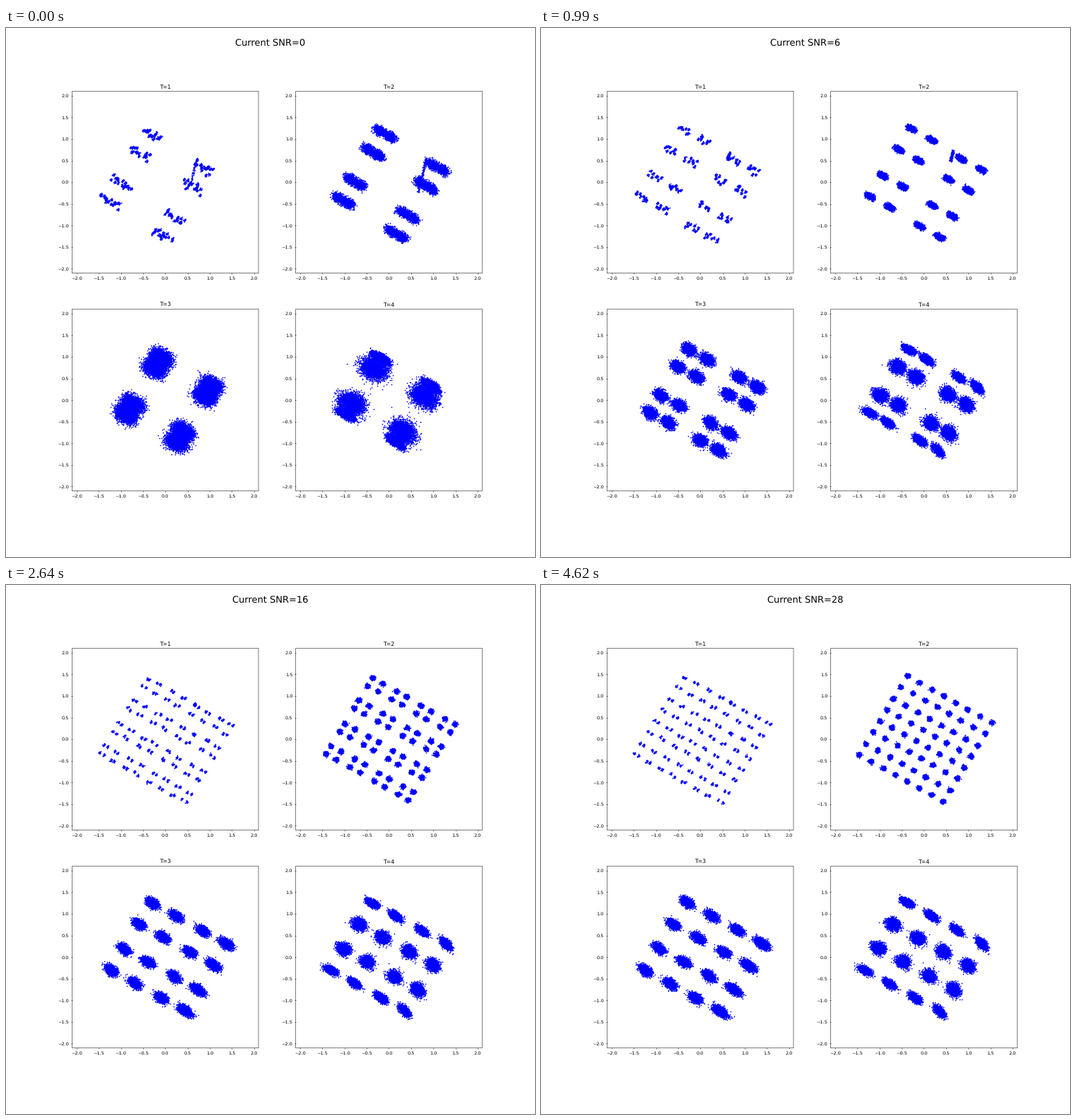
Write a matplotlib script that moves like this. It is 748x748 px and loops after 4950 ms.

```python
import numpy as np
import matplotlib.pyplot as plt
from matplotlib.animation import FuncAnimation

STAGE, DPI = 748, 46.75
STEP_MS, STEPS = 330, 15
U = np.array([.54, -.305])  # direction along a row of the constellation
V = np.array([-.31, -.515])  # direction from row to row
rng = np.random.default_rng(7)


def decay(snr, tau):
    return np.exp(-snr / tau)


def ramp(snr, knee, power):
    """Rise from 0 to 1 around the knee: a finer bit becomes usable."""
    return 1 - np.exp(-(snr / knee) ** power)


def levels(*amps):
    """All sums of +-amplitude, coarsest bit first."""
    out = np.zeros(1)
    for amp in amps:
        out = np.add.outer(out, [-amp, amp]).ravel()
    return out


def lattice(cols, rows, centre):
    """Cluster centres, row by row."""
    grid = cols[None, :, None] * U + rows[:, None, None] * V
    return grid.reshape(-1, 2) + centre


def normal(k, n, limit):
    return np.clip(rng.standard_normal((k, n, 2)), -limit, limit)


def spread(noise, major, minor, angle):
    """Turn unit noise (k, n, 2) into tilted ellipses."""
    major, minor, angle = (np.reshape(v, (-1, 1)) for v in (major, minor, angle))
    c, s = np.cos(np.radians(angle)), np.sin(np.radians(angle))
    a, b = noise[..., 0] * major, noise[..., 1] * minor
    return np.stack([a * c - b * s, a * s + b * c], axis=-1)


def scatter(centres, offsets):
    return (centres[:, None] + offsets).reshape(-1, 2)


def fine_lattice(snr, cols, rows, centre):
    """Lattice of T=1 and T=2; its right half sags while the SNR is low."""
    centres = lattice(cols, rows, centre)
    right = np.tile(cols > 0, len(rows))
    centres[:, 1] -= .1 * decay(snr, 10) * right
    return centres


def coarse_bits(snr):
    cols = 1 + .1 * decay(snr, 6), .51 - .31 * decay(snr, 5)
    rows = 1 + .08 * decay(snr, 12), .52 - .1 * decay(snr, 10)
    return cols, rows


def tail(snr, start, shift, scale, noise):
    """Thin streak hanging from one cluster, shrinking with the SNR."""
    length = .8 * decay(snr, 5)
    t = np.linspace(0, length * scale, len(noise))[:, None]
    start = start + np.array(shift) * min(1, length / .15)
    return start + t * (-.24, -1) + .014 * noise


dots, dot_shift = normal(128, 16, 1.6), normal(128, 1, 2)
patches = normal(64, 170, 2.6)
clouds_3, clouds_4 = normal(16, 1400, 4), normal(16, 1400, 4)
tail_1, tail_2 = normal(1, 70, 1.5)[0], normal(1, 150, 2)[0]


def panel_1(snr):
    cols, rows = coarse_bits(snr)
    cols = levels(*cols, .09 + .165 * ramp(snr, 11, 1.6), .045 + .025 * ramp(snr, 11, 1.6))
    rows = levels(*rows, .055 + .18 * ramp(snr, 15, 4))
    grid = fine_lattice(snr, cols, rows, (.05 - .24 * decay(snr, 8), 0))
    shift = dot_shift * (.012 + .024 * decay(snr, 8))
    pts = scatter(grid, shift + spread(dots, .02, .013, 50))
    return np.vstack([pts, tail(snr, grid[8], (0, .06), .7, tail_1)])


def panel_2(snr):
    cols, rows = coarse_bits(snr)
    cols = levels(*cols, .25 * ramp(snr, 11, 1.6))
    rows = levels(*rows, .245 * ramp(snr, 15, 4))
    grid = fine_lattice(snr, cols, rows, (.03, .02))
    fade = decay(snr, 4)
    pts = scatter(grid, spread(patches, .026 + .05 * fade, .025 + .024 * fade, -36))
    return np.vstack([pts, tail(snr, grid[4], (-.14, .15), 1, tail_2)])


def coarse_lattice(snr, centre):
    cols = levels(1.05, .52 - .385 * decay(snr, 6))
    rows = levels(1.03, .5 - .26 * decay(snr, 7))
    return lattice(cols, rows, centre)


def panel_3(snr):
    col = np.tile(np.arange(4), 4)
    fade = decay(snr, 4)
    major = .062 + .014 * ramp(snr, 12, 1) + .03 * fade
    major = major + .02 * ramp(snr, 12, 1) * (col == 3)
    offsets = spread(clouds_3, major, .045 + .04 * fade, -36)
    return scatter(coarse_lattice(snr, (.07, .01)), offsets)


def panel_4(snr):
    row, col = np.divmod(np.arange(16), 4)
    inner = (row == 1) | (row == 2)
    widen = .05 * inner * decay(snr, 3)
    major = .077 + widen
    minor = np.where(inner, .062, .038) + widen
    offsets = spread(clouds_4, major, minor, -30 - 6 * col)
    return scatter(coarse_lattice(snr, (-.02, .01)), offsets)


# Soft, unsnapped edges for lines, markers and glyphs.
plt.rcParams.update({"font.family": "DejaVu Sans", "path.snap": False,
                     "text.hinting": "none"})
fig, axes = plt.subplots(2, 2, figsize=(STAGE / DPI, STAGE / DPI), dpi=DPI)
fig.subplots_adjust(left=.125, right=.9, bottom=.125, top=.88, wspace=.2, hspace=.2)
title = fig.suptitle("", fontsize=20)
panels = [panel_1, panel_2, panel_3, panel_4]
lines = []
for n, ax in enumerate(axes.flat, 1):
    ax.set(xlim=(-2.1, 2.1), ylim=(-2.1, 2.1), title=f"T={n}",
           xticks=np.arange(-2, 2.1, .5), yticks=np.arange(-2, 2.1, .5))
    lines += ax.plot([], [], "o", color="#0000ff", ms=2.6, mew=0)


def update(step):
    snr = 2 * step
    title.set_text(f"Current SNR={snr}")
    for line, panel in zip(lines, panels):
        line.set_data(*panel(snr).T)
    return [title, *lines]


anim = FuncAnimation(fig, update, frames=STEPS, interval=STEP_MS,
                     repeat=True, repeat_delay=0, blit=False)
plt.show()
```
